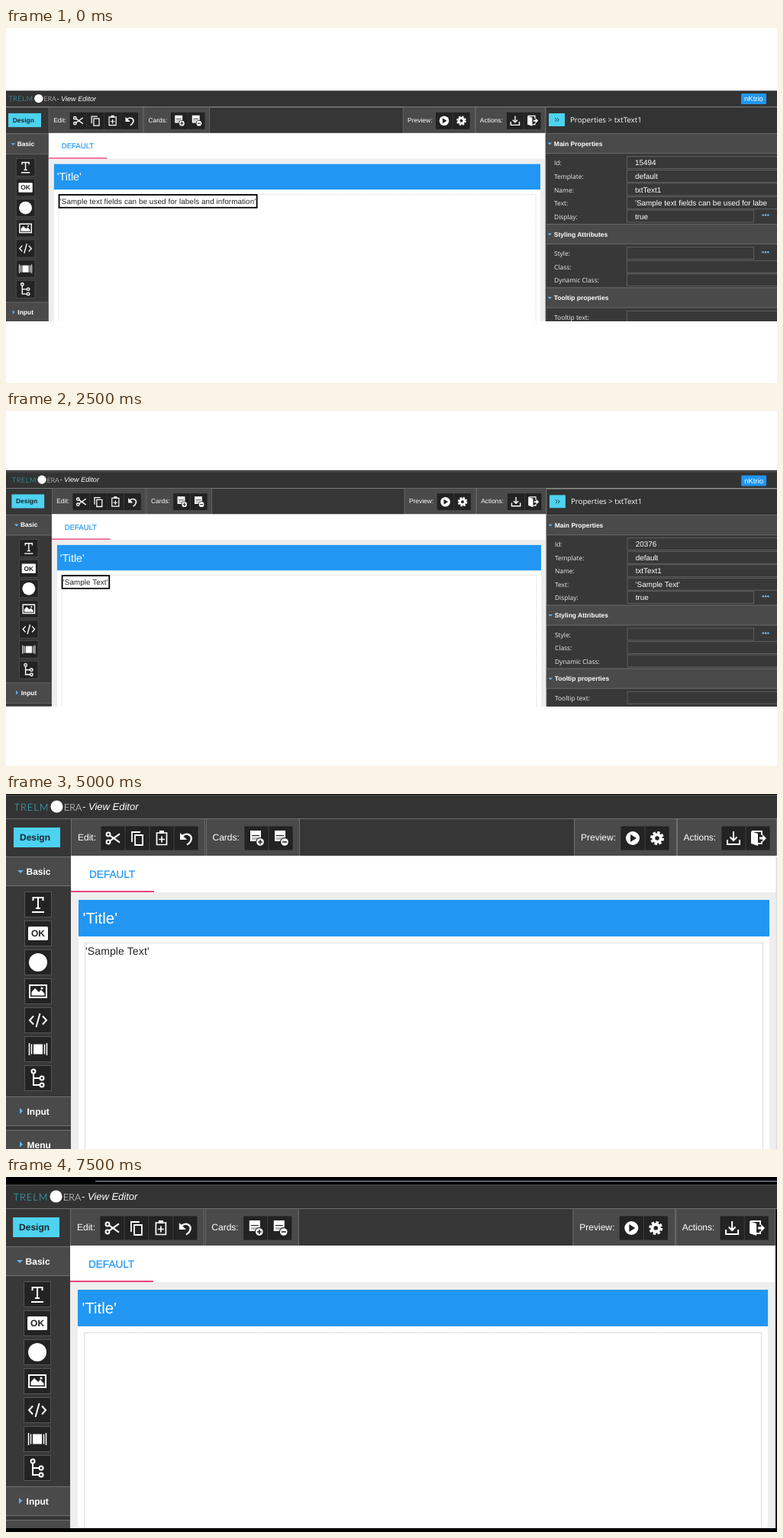
Recreate the animation shown at these times as an HTML page. Size 1010 by 466 pixels, loop 10 s.

```html
<!DOCTYPE html>
<html lang="en">
<head>
<meta charset="utf-8">
<title>View editor</title>
<style>
html, body { margin: 0; width: 100%; height: 100%; overflow: hidden; background: #fff; }
svg { display: block; width: 100vw; height: 100vh; text-rendering: geometricPrecision; }
text { font-family: "Liberation Sans", Arial, sans-serif; fill: #fff; white-space: pre; }
.label { font-family: "Open Sans", "Noto Sans", sans-serif; }
.brand { font-family: Lato, sans-serif; font-weight: 300; }
.bold { font-weight: 700; }
.line { fill: none; stroke: #fff; stroke-width: 2; }
</style>
</head>
<body>
<svg id="stage" viewBox="0 0 1010 466" preserveAspectRatio="none">
  <defs><clipPath id="crop"><rect id="cropBox" width="1010"/></clipPath></defs>
  <rect id="back" width="1010" height="466"/>
  <path id="topLine" d="M117 5.5H1010" stroke="#a3a3c8"/>
  <g clip-path="url(#crop)">
    <g id="editor"></g>
    <g id="panel"></g>
  </g>
</svg>
<script>
const $ = id => document.getElementById(id);
const BLUE = '#2196f3', CYAN = '#4dd2f0', LINK = '#64b5f6', EDGE = '#707070';
const DARK = '#363636', MID = '#4a4a4a', BUTTON = '#232323';

const rect = (x, y, w, h, fill, more = '') =>
  `<rect x="${x}" y="${y}" width="${w}" height="${h}" fill="${fill}" ${more}/>`;
const text = (x, y, size, str, more = '') =>
  `<text x="${x}" y="${y}" font-size="${size}" ${more}>${str}</text>`;
const line = (d, more = '') => `<path class="line" d="${d}" ${more}/>`;
const solid = (d, fill = '#fff') => `<path d="${d}" fill="${fill}"/>`;
const disc = (x, y, r, fill = '#fff') => `<circle cx="${x}" cy="${y}" r="${r}" fill="${fill}"/>`;
const ring = (x, y, r, more = '') => `<circle class="line" cx="${x}" cy="${y}" r="${r}" ${more}/>`;
const at = (x, y, body) => `<g transform="translate(${x} ${y})">${body}</g>`;

const cardIcon = sign =>
  rect(-8, -10, 14, 14, '#fff') + rect(-6, -4, 10, 1.2, BUTTON) + rect(-6, -1, 10, 3, '#bbb') +
  disc(5, 5, 6, BUTTON) + disc(5, 5, 4.8) + line(sign, `style="stroke:${BUTTON};stroke-width:1.6"`);

const icons = {
  cut: ring(-6, -5, 2.4) + ring(-6, 5, 2.4) + line('M-4 -3.6L9 5.6M-4 3.6L9 -5.6', 'stroke-width="2.4"'),
  copy: line('M-3 -4H7V9H-3ZM-7 5V-8H4', 'style="stroke-width:1.8"'),
  paste: line('M-6.5 -7H6.5V8.5H-6.5ZM0 -2.5V5.5M-4 1.5H4', 'style="stroke-width:1.7"') + rect(-3, -10, 6, 4, '#fff'),
  undo: line('M-5 -3C1 -8 8 -4 6.5 2C5.8 5 4 7 1 8.5', 'style="stroke-width:2.3"') + solid('M-8 -7V2H1Z'),
  addCard: cardIcon('M5 2V8M2 5H8'),
  dropCard: cardIcon('M2 5H8'),
  play: disc(0, 0, 9) + solid('M-3 -5L5 0L-3 5Z', BUTTON),
  gear: ring(0, 0, 7.3, 'style="stroke-width:3.4;stroke-dasharray:3.4 2.33"') + ring(0, 0, 4.8, 'style="stroke-width:4"'),
  save: line('M0 -9V3M-4.5 -1.5L0 3L4.5 -1.5M-8 2V8H8V2'),
  exit: line('M-8 -9H5V-4M5 4V7H0', 'style="stroke-width:1.8"') + solid('M-9 -9L0 -6V10L-9 7Z') +
    solid('M2 -1.5H6V-5L11 0L6 5V1.5H2Z'),
  type: line('M-6.5 -5V-9H6.5V-5M0 -9V5M-3 5H3M-8 10H8'),
  ok: rect(-13, -9, 26, 18, '#fff', 'rx="1.5"') +
    text(0, 4.3, 12, 'OK', 'class="bold" text-anchor="middle" style="fill:#232323"'),
  badge: disc(0, 0, 12),
  image: line('M-11 -8H11V8H-11Z') + solid('M-8.5 5.5V1L-4 -4L1 1L4 -2L8.5 3V5.5Z') + disc(5, -4, 1.6),
  code: line('M-6 -5.5L-11 0L-6 5.5M6 -5.5L11 0L6 5.5M2.5 -9L-2.5 9'),
  slides: rect(-6, -6.5, 12, 13, '#fff') +
    line('M-8.5 -6.5V6.5M8.5 -6.5V6.5M-11.5 -8V8M11.5 -8V8', 'style="stroke-width:1.5"'),
  tree: ring(-6, -9, 2.5) + ring(5, 0, 2.5) + ring(5, 9, 2.5) + line('M-6 -6.5V9H2.5M-6 0H2.5')
};

const tool = (name, x) =>
  rect(x - 15, 43, 30, 30, BUTTON, 'stroke="#1c1c1c"') + at(x, 58, icons[name]);
const sideItem = (name, i) => {
  const y = 145 + 38 * i;
  return rect(24.5, y - 16.5, 35, 33, BUTTON, 'stroke="#555"') + at(42, y, icons[name]);
};
const sideHead = (y, label, open) =>
  rect(-1, y, 86, 39, MID) + rect(-1, y, 86, 1, EDGE) + rect(-1, y + 38, 86, 1, EDGE) +
  solid(open ? `M15 ${y + 18}h8l-4 4z` : `M18 ${y + 15}v8l4 -4z`, LINK) +
  text(open ? 26.5 : 27.5, y + 23.5, 12, label, 'class="bold"');
const group = (x, w) => rect(x + .5, 32.5, w - 1, 49, MID, `stroke="${EDGE}"`);

function editorMarkup() {
  return rect(-10, -2, 1460, 3, '#000') + rect(-10, 1, 1460, 1, '#555') +
    rect(-10, 2, 1460, 30, '#333') + rect(-10, 32, 1460, 1, EDGE) +
    text(10.5, 21.5, 13, 'TRELM', 'class="brand" style="fill:#35c4dc" letter-spacing=".9"') +
    disc(66.5, 16.5, 8) +
    text(76, 21.5, 12.6, 'ERA', 'class="brand"') +
    text(100, 21, 13, '- View Editor', 'font-style="italic"') +
    rect(-10, 33, 1020, 49, DARK) + rect(-10, 82, 95, 400, '#383838') +
    rect(10, 44, 61, 26, CYAN) +
    text(18, 61, 12, 'Design', 'class="bold" style="fill:#16262c"') +
    group(85, 176) + group(262, 123) + group(744, 135) + group(879, 131) +
    text(94, 61, 12, 'Edit:') + text(270.5, 61, 12, 'Cards:') +
    text(753, 61, 12, 'Preview:') + text(887.5, 61, 12, 'Actions:') +
    ['cut', 'copy', 'paste', 'undo'].map((n, i) => tool(n, 140 + 32 * i)).join('') +
    tool('addCard', 328) + tool('dropCard', 360) + tool('play', 821) + tool('gear', 853) +
    tool('save', 953) + tool('exit', 985) +
    sideHead(82, 'Basic', true) +
    ['type', 'ok', 'badge', 'image', 'code', 'slides', 'tree'].map(sideItem).join('') +
    sideHead(397, 'Input') + sideHead(441, 'Menu') +
    rect(85, 81, 925, 48, '#fff') + rect(85, 129, 925, 360, '#eee') +
    rect(1008.5, 82, 1.5, 400, '#ddd') +
    text(109, 110, 13.6, 'DEFAULT', `style="fill:${BLUE};stroke:${BLUE};stroke-width:.25"`) +
    rect(85, 127, 109, 2, '#f0437f') +
    rect(95, 139, 905, 48, BLUE) + text(100.5, 170, 20.4, "'Title'") +
    rect(95, 187, 905, 300, '#fff') +
    rect(103.5, 195.5, 888, 300, 'none', 'stroke="#bbb" stroke-dasharray="1 1"') +
    rect(104.5, 196.5, 0, 24, '#fff', 'id="selection" stroke="#000" stroke-width="2.6"') +
    text(0, 0, 14, '', 'id="sample" letter-spacing=".12" style="fill:#222"');
}

const section = (y, label) =>
  rect(707, y, 303, 27, MID) + rect(707, y, 303, .8, EDGE) + rect(707, y + 26.2, 303, .8, EDGE) +
  solid(`M709.5 ${y + 12.5}h5.6l-2.8 2.8z`, LINK) + text(717.8, y + 16.5, 8.5, label, 'class="bold"');
const field = (y, label, id = '', value = '', dots = false) =>
  text(718, y + 3.2, 8.45, label, 'class="label" style="fill:#eee"') +
  rect(813.4, y - 8.4, dots ? 166 : 199, 16, '#383838', 'stroke="#686868" stroke-width=".8"') +
  text(824, y + 3.2, 9.95, value, id && `id="${id}"`) +
  (dots ? [991.7, 995, 998.3].map(x => disc(x, y - 1.8, 1.3, LINK)).join('') : '');

function panelMarkup() {
  return rect(963, 86, 33, 14, BLUE, 'rx="1.5"') +
    text(979.5, 96.4, 9.5, 'nKtrio', 'text-anchor="middle"') +
    rect(707, 104, 310, 290, '#383838') + rect(707, 104, 310, 34, '#333') +
    rect(706.6, 103.4, 310, .8, EDGE) + rect(706.6, 104, .8, 290, EDGE) +
    rect(711, 112, 21, 17, CYAN) +
    line('M719 118.2L721.3 120.5L719 122.8M722 118.2L724.3 120.5L722 122.8', 'style="stroke:#1c3a44;stroke-width:1"') +
    text(739, 124.2, 9.75, 'Properties &gt; txtText1', 'class="label"') +
    section(138, 'Main Properties') +
    field(177, 'Id:', 'idValue') + field(194.8, 'Template:', '', 'default') +
    field(212.3, 'Name:', '', 'txtText1') + field(229.9, 'Text:', 'textValue') +
    field(247.4, 'Display:', '', 'true', true) +
    section(257, 'Styling Attributes') +
    field(296, 'Style:', '', '', true) + field(313.7, 'Class:') + field(331.2, 'Dynamic Class:') +
    section(340.5, 'Tooltip properties') + field(379.7, 'Tooltip text:');
}

// view: scale x, scale y, shift x, shift y of the editor; crop: top, bottom
const HOLD = 2500;
const scenes = [
  { view: [.704, .702, -4, 81], crop: [82, 385], panel: [1, 1, 0, 0], id: '15494', box: 368,
    sample: "'Sample text fields can be used for labels and information'",
    value: "'Sample text fields can be used for labe" },
  { view: [.7006, .7, .4, 78.6], crop: [78, 388], panel: [.997, .995, 3.1, -1.1], id: '20376', box: 88,
    sample: "'Sample Text'", value: "'Sample Text'" },
  { view: [1, 1, 0, 0], crop: [0, 466], sample: "'Sample Text'" },
  { view: [.999, 1, -.9, 9], crop: [9, 461], sample: '', black: true }
];

const set = (id, attrs) => Object.entries(attrs).forEach(([k, v]) => $(id).setAttribute(k, v));
const shown = on => on ? 'visible' : 'hidden';
const matrix = ([sx, sy, x, y]) => `matrix(${sx} 0 0 ${sy} ${x} ${y})`;

function show(s) {
  set('back', { fill: s.black ? '#000' : '#fff' });
  set('topLine', { visibility: shown(s.black) });
  set('cropBox', { y: s.crop[0], height: s.crop[1] - s.crop[0] });
  set('editor', { transform: matrix(s.view) });
  set('panel', { visibility: shown(s.panel), transform: matrix(s.panel || s.view) });
  set('selection', { visibility: shown(s.box), width: s.box || 0 });
  set('sample', { x: s.box ? 106.3 : 104, y: s.box ? 213 : 211 });
  $('sample').textContent = s.sample;
  $('idValue').textContent = s.id || '';
  $('textValue').textContent = s.value || '';
}

$('editor').innerHTML = editorMarkup();
$('panel').innerHTML = panelMarkup();

const start = performance.now();
let current = -1;
function tick() {
  const next = Math.floor((performance.now() - start) / HOLD) % scenes.length;
  if (next !== current) show(scenes[current = next]);
  requestAnimationFrame(tick);
}
tick();
</script>
</body>
</html>
```
